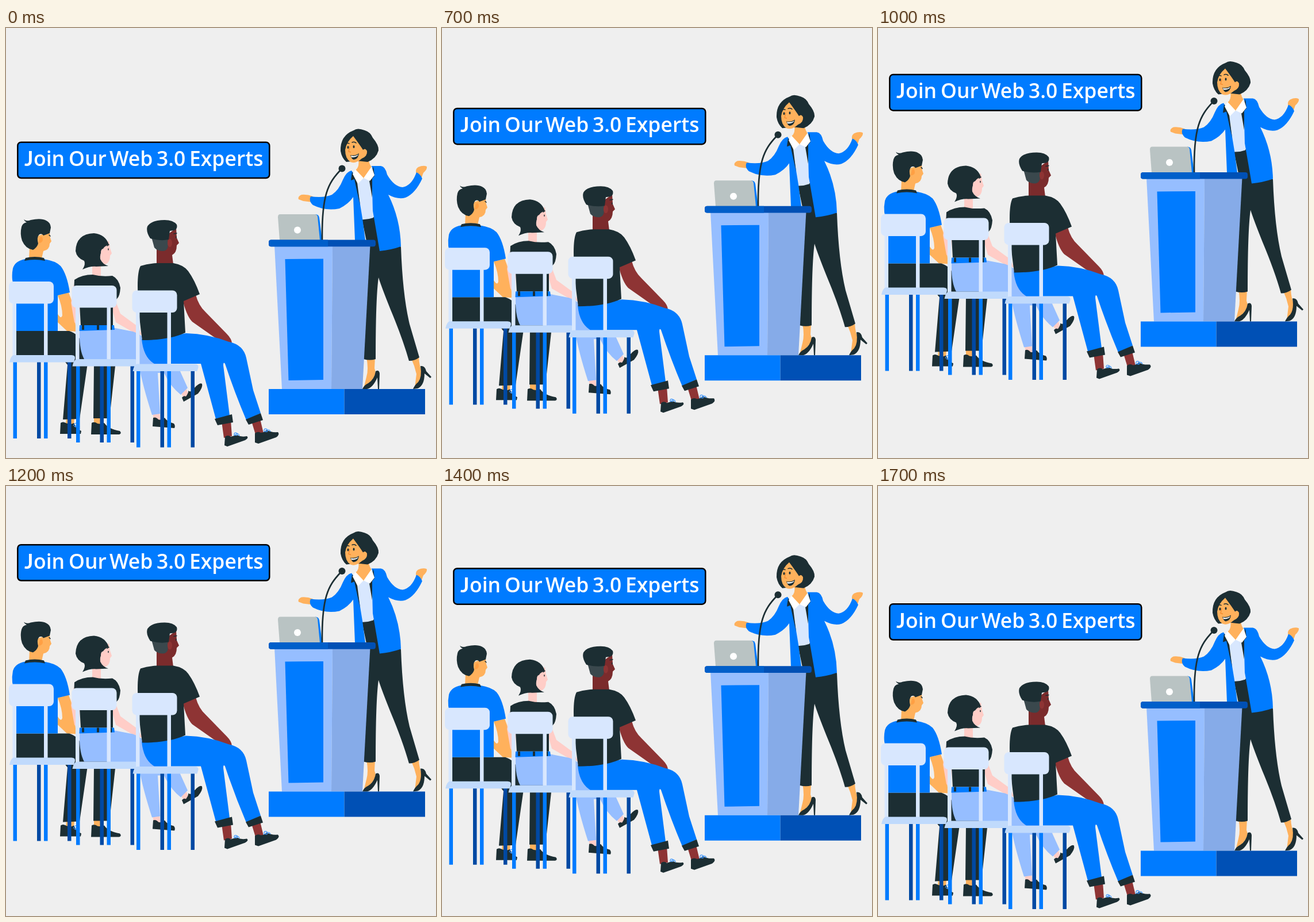
Animation of 748x748 px, one loop 1.8 s. Source, as an HTML page:

```html
<!DOCTYPE html>
<html lang="en">
<head>
<meta charset="utf-8">
<style>
  html, body { margin: 0; width: 100%; height: 100%; overflow: hidden; background: #efefef; }
  svg { display: block; width: 100vw; height: 100vh; }
  text { font: 600 35.5px "Open Sans", "Noto Sans", sans-serif; fill: #fff; }
  .cap { font: 700 36px Lato, sans-serif; }
  .blue { fill: #007bff; }
  .navy { fill: #0050b5; }
  .steel { fill: #0049a3; }
  .dark { fill: #1c2e33; }
  .pale { fill: #d8e7fe; }
  .sky { fill: #96beff; }
  .tan { fill: #ffb15c; }
  .pink { fill: #ffcdc7; }
  .brown { fill: #8e3434; }
  .umber { fill: #7b2b2c; }
  .line { fill: none; stroke: #1c2e33; stroke-width: 1.5; stroke-linecap: round; }
  .lace { fill: none; stroke: #3c96ff; stroke-width: 1.2; }
</style>
</head>
<body>
<svg viewBox="0 0 748 748">
  <defs>
    <g id="chair">
      <path class="steel" d="M54 581h6.500v133h-6.500zM107 581h6.500v133h-6.500z"/>
      <path class="blue" d="M12.500 581h6.500v133h-6.500zM66 581h6.500v133h-6.500z"/>
      <path class="pale" d="M11.500 476h6.500v96h-6.500zM66 476h6.500v96h-6.500z"/>
      <rect class="pale" x="5" y="441" width="78" height="38.500" rx="8"/>
      <path fill="#c0dafc" d="M13 569H114Q121 569 120 575L118 581.500H6Q8 571 13 569Z"/>
    </g>
  </defs>

  <g id="scene">
    <g id="banner">
      <rect class="blue" x="20.300" y="198.700" width="438" height="62.300" rx="6" stroke="#000" stroke-width="2.500"/>
      <text y="240"><tspan class="cap" x="32">J</tspan><tspan x="48">oin</tspan> <tspan x="109">Our</tspan> <tspan x="180">Web</tspan> <tspan x="262">3.0</tspan> <tspan x="319">Experts</tspan></text>
    </g>

    <g id="speaker">
      <path class="tan" d="M627 572H642L641 592Q646 602 636 613L622 627 627 607Q631 594 627 572ZM705 575L718 572Q719 590 724 598 723 610 711 626L714 602Q711 588 705 575Z"/>
      <path class="dark" d="M620 628Q623 621 630 618 641 611 643 597 649 594 650 601L649 628H647L646 608Q638 626 628 628ZM708 628Q711 621 717 616 724 607 721 588 729 587 731 597L740 607 738 609 728 601Q728 622 716 627Z"/>
      <path class="dark" d="M619 332L645 328 687 381Q690 465 702 515L719 573Q711 579 701 579 690 540 669 490 653 450 648 434 643 470 643 576 633 579 622 576L631 390Z"/>
      <path class="pale" d="M608 249L637 243 639 330Q628 334 617 333Z"/>
      <path class="tan" d="M534 293Q524 289 514 290 507 293 509 298L517 301 533 303ZM714 254Q711 246 717 242 726 238 732 241 733 246 726 252L722 263Z"/>
      <path class="blue" d="M601 248Q592 250 586 264 579 282 567 290 553 296 530 293 526 301 534 308 556 319 580 314 596 306 604 294L607 369H625L620 331 608 258ZM636 240H652Q660 241 663 255 675 276 690 277 706 274 714 251 721 254 724 262 712 288 695 295 682 299 665 290 686 332 687 380 670 386 650 388L638 318Z"/>
      <path class="dark" d="M602 250L600 265 606 263 616 309 611 269ZM639 241L641 257 637 262 637 295 632 266Z"/>
      <path class="tan" d="M613 229L631 229Q632 238 637 243L622 262 608 247Q615 242 613 229Z"/>
      <path fill="#fff" d="M608 246L622 261 612 271 603 254ZM636 241L641 256 633 266 622 261Z"/>
      <path class="dark" d="M582 214Q581 187 605 178 611 173 624 178 634 181 638 191 649 204 648 213 644 227 629 233L611 231 592 233Q584 226 582 214Z"/>
      <path class="tan" d="M604 188Q592 198 590 212 590 227 599 233 608 237 619 227 629 223 628 214 625 208 621 212 616 204 604 188Z"/>
      <path class="line" d="M591 202Q594 199 597 201M602 199Q606 197 609 200"/>
      <ellipse class="dark" cx="595" cy="207.500" rx="1.500" ry="2.500"/>
      <ellipse class="dark" cx="605" cy="206.500" rx="1.500" ry="2.500"/>
      <path d="M598 206L596 215 600 216" fill="none" stroke="#f28b2f" stroke-width="1.300"/>
      <path class="dark" d="M599 221Q607 223 614 218 613 228 605 229 601 228 599 221Z"/>
      <path fill="#fff" d="M600 222Q607 224 613 220 611 225 601 225Z"/>
    </g>

    <g id="podium">
      <path class="blue" d="M538 324Q544 324 545 330L550 369H543Z"/>
      <path fill="#b9c3c3" d="M477 324H537Q541 324 542 328L546 369H476L473 329Q473 324 477 324Z"/>
      <circle cx="507" cy="351.500" r="6" fill="#fff"/>
      <path class="line" style="stroke-width:2.700" d="M582 247C560 270 549 291 550 369"/>
      <circle class="dark" cx="584.500" cy="244.500" r="6"/>
      <path class="sky" d="M467 378H568L566 628H480Z"/>
      <path fill="#86abe8" d="M568 378H633.500L620 628H566Z"/>
      <path class="blue" d="M485.500 402L552 401.500V612L491.500 613Z"/>
      <rect class="navy" x="457" y="368.600" width="186" height="11.600" rx="4"/>
      <path fill="#005fca" d="M461 368.600H560V380.200H461Q457 380 457 376V373Q457 369 461 368.600Z"/>
      <path class="blue" d="M457 628H588.500V672H457Z"/>
      <path class="navy" d="M588.500 628H729V672H588.500Z"/>
    </g>

    <g id="viewer-left">
      <path class="tan" d="M41 380L57 361 76 355 77 365 79 371 76 375Q76 386 65 388L62 401 40 402ZM90 465L109 460Q117 480 119 498L122 528 106 527 89 511V496Q96 508 98 500 98 484 90 465Z"/>
      <path class="tan" d="M105 679H119L118 690 104 688ZM153 676H165L164 690 153 689Z"/>
      <path class="dark" d="M18 527H110Q126 532 132 548L187 573 190 588 180 679H152L153 585 142 583 128 680 99 681 107 586 98 575H18Z"/>
      <path class="dark" d="M95 687Q99 684 104 687 112 691 118 687 122 697 131 701L130 706H94ZM149 687Q154 684 159 688 167 690 171 687 177 697 198 701 202 705 197 707H148Z"/>
      <path class="lace" d="M117 692Q121 684 124 690 126 697 119 693 125 688 128 694"/>
      <path class="blue" d="M33 402Q16 405 12 418 10 428 11 438L18 470V527H90L90 465 111 460Q106 428 95 414 86 405 66 402Z"/>
      <path class="dark" d="M34 400Q50 396 66 400L68 405Q50 401 32 405Z"/>
      <path class="dark" d="M47 386Q34 384 28 370 24 358 27 346 29 339 36 338 32 336 31 333 36 337 43 334 61 330 70 335 77 338 78 347L76 357 65 361Q63 357 58 359 53 364 56 375 54 382 47 386Z"/>
      <path d="M59 364Q64 361 64 369 63 374 57 374Z" fill="#ffa044"/>
      <path class="line" d="M75 360L77 362"/>
    </g>
    <use href="#chair"/>

    <g id="viewer-middle">
      <path class="pink" d="M118 446L129 480 126 520 119 512 113 478ZM150 413H165V431Q157 434 150 430ZM181 476L190 473 199 497 229 519 237 534 226 532 191 512Z"/>
      <path class="pink" d="M255 669H267L269 685 257 683ZM304 634L313 626 318 638 309 643Z"/>
      <path class="sky" d="M128 526L190 522 221 528Q248 538 262 568L302 595 316 626 304 638Q286 624 275 600L264 600 268 671 254 673Q237 620 232 589L180 576H136Q127 560 128 526Z"/>
      <path class="dark" d="M306 643Q309 639 313 641 318 634 317 631 323 635 328 626 337 616 341 619 343 625 334 636L309 650ZM256 678Q261 676 265 681 271 683 276 678 280 685 292 688 295 692 293 696L255 693Z"/>
      <path class="dark" d="M119 438Q132 429 151 429 166 433 185 431 196 436 199 452 198 467 193 471L186 478V517H130L128 481 118 460Z"/>
      <path class="blue" d="M128 517H188L189 525 127 527Z"/>
      <path class="dark" d="M132 517h4v8h-4zM158 517h4v8h-4zM180 517h4v8h-4z"/>
      <path class="pink" d="M160 382L179 370 181 383 184 392 181 396Q181 411 168 412L153 416Z"/>
      <path class="dark" d="M121 388Q122 358 153 357 173 359 179 377 170 379 167 388 163 393 164 402 168 411 178 414L157 415Q146 414 133 420 139 411 136 405 123 400 121 388Z"/>
      <ellipse class="pink" cx="169" cy="390" rx="4" ry="6"/>
      <path class="line" d="M176 379L179 377M178 384v2"/>
    </g>
    <use href="#chair" x="109.500" y="7"/>

    <g id="viewer-right">
      <path class="umber" d="M262 380L280 360 296 348 297 365 301 374 297 378Q297 391 289 395L291 411 262 412Z"/>
      <path class="brown" d="M307 472L330 464Q335 483 347 494L384 532Q393 541 393 549L385 551 361 537 324 511Q314 501 307 472Z"/>
      <path class="brown" d="M375 684L391 682 393 710 379 713ZM427 684L442 680 448 705 434 707Z"/>
      <path class="blue" d="M236 541Q270 540 313 531 352 532 388 546 413 551 418 574L430 630 443 670 418 682Q398 635 381 584 378 580 378 587L389 674 365 680 339 584H258Q239 573 236 541Z"/>
      <path class="dark" d="M363 680L393 672 395 686 368 691ZM417 681L443 670 447 682 422 690Z"/>
      <path class="dark" d="M381 711Q386 707 391 711 397 709 402 708 409 712 419 710 423 713 416 717L385 728 380 726ZM433 705Q438 701 443 704 449 704 453 699 461 704 473 703 477 707 470 712L439 723 433 721Z"/>
      <path class="lace" d="M397 709Q396 702 402 705 404 710 398 708 405 703 406 710M449 703Q448 695 454 698 457 704 451 702 457 696 460 702"/>
      <path class="dark" d="M234 414Q246 410 262 409H291Q309 412 317 423 328 438 337 463L309 475 312 530Q284 543 237 543 229 487 229 449 229 423 234 414Z"/>
      <path fill="#3a484d" d="M252 360L282 362 281 373Q284 386 274 388 263 388 258 382Z"/>
      <path class="dark" d="M251 366Q243 354 246 345 253 334 276 334 291 334 297 342 299 349 293 352L285 353 283 368Q268 371 251 366Z"/>
      <ellipse class="brown" cx="285" cy="374" rx="4" ry="7"/>
      <path class="line" d="M292 358L297 357M296 363v2"/>
    </g>
    <use href="#chair" x="214.500" y="15.500"/>
  </g>
</svg>
<script>
  const scene = document.getElementById("scene");

  // Rise in 100 ms steps, rest, then sink slightly past the start.
  function offsetAt(ms) {
    const step = Math.floor((ms % 1800) / 100);
    if (step >= 12) return -96.5 + 20.6 * (step - 12);
    return -19.6 * Math.min(6, Math.max(0, step - 4));
  }

  function draw() {
    scene.setAttribute("transform", `translate(0 ${offsetAt(performance.now())})`);
    requestAnimationFrame(draw);
  }
  draw();
</script>
</body>
</html>
```
